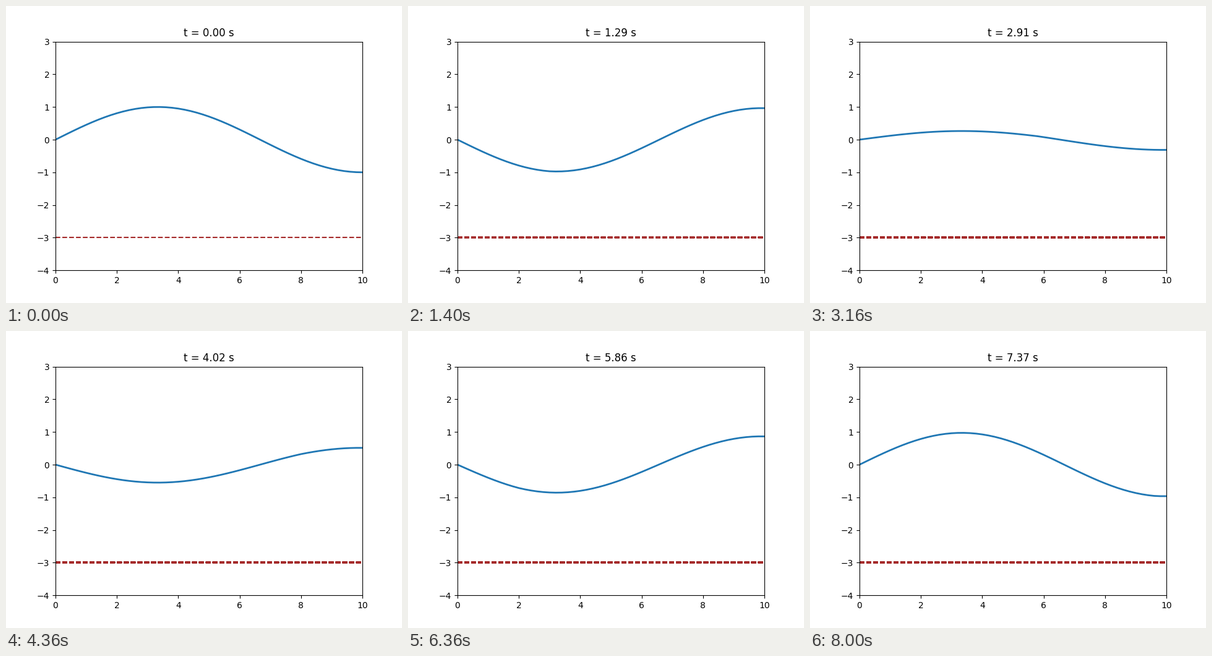
These frames come from a looping animation (640 px wide and 480 px high, 8.04 s). A matplotlib script:

```python
import numpy as np
import matplotlib.pyplot as plt
from matplotlib.animation import FuncAnimation

# Linear shallow water on a staggered grid: open left end, wall on the right
G, DEPTH = 9.81, 3.0
LENGTH, CELLS = 10.0, 50
FRAMES, INTERVAL = 201, 40
MAX_STROKES = 64  # overlaid bed strokes until their soft edges are solid

dx = LENGTH / CELLS
dt = dx / np.sqrt(G * DEPTH)
x = np.linspace(0, LENGTH, CELLS + 1)


def simulate():
    eta = np.sin(1.5 * np.pi * x / LENGTH)
    u = np.zeros(CELLS)
    states = [eta.copy()]
    for _ in range(FRAMES - 1):
        u -= G * dt / dx * np.diff(eta)
        eta[1:-1] -= DEPTH * dt / dx * np.diff(u)
        eta[0] = 0
        eta[-1] = eta[-2]
        states.append(eta.copy())
    return states


surface = simulate()

fig, ax = plt.subplots(figsize=(6.4, 4.8), dpi=100)
ax.set_xlim(0, LENGTH)
ax.set_ylim(-4, 3)
wave, = ax.plot(x, surface[0], lw=2)
bed = [ax.axhline(-DEPTH, color="brown", ls="--") for _ in range(MAX_STROKES)]
title = ax.set_title("t = 0.00 s")


def update(i):
    wave.set_ydata(surface[i])
    title.set_text(f"t = {i * dt:.2f} s")
    # The bed is restroked every step, so its edges build up
    for k, stroke in enumerate(bed):
        stroke.set_visible(k <= i)
    return [wave, title, *bed]


anim = FuncAnimation(fig, update, frames=FRAMES, interval=INTERVAL,
                     repeat=True, repeat_delay=0)
plt.show()
```
